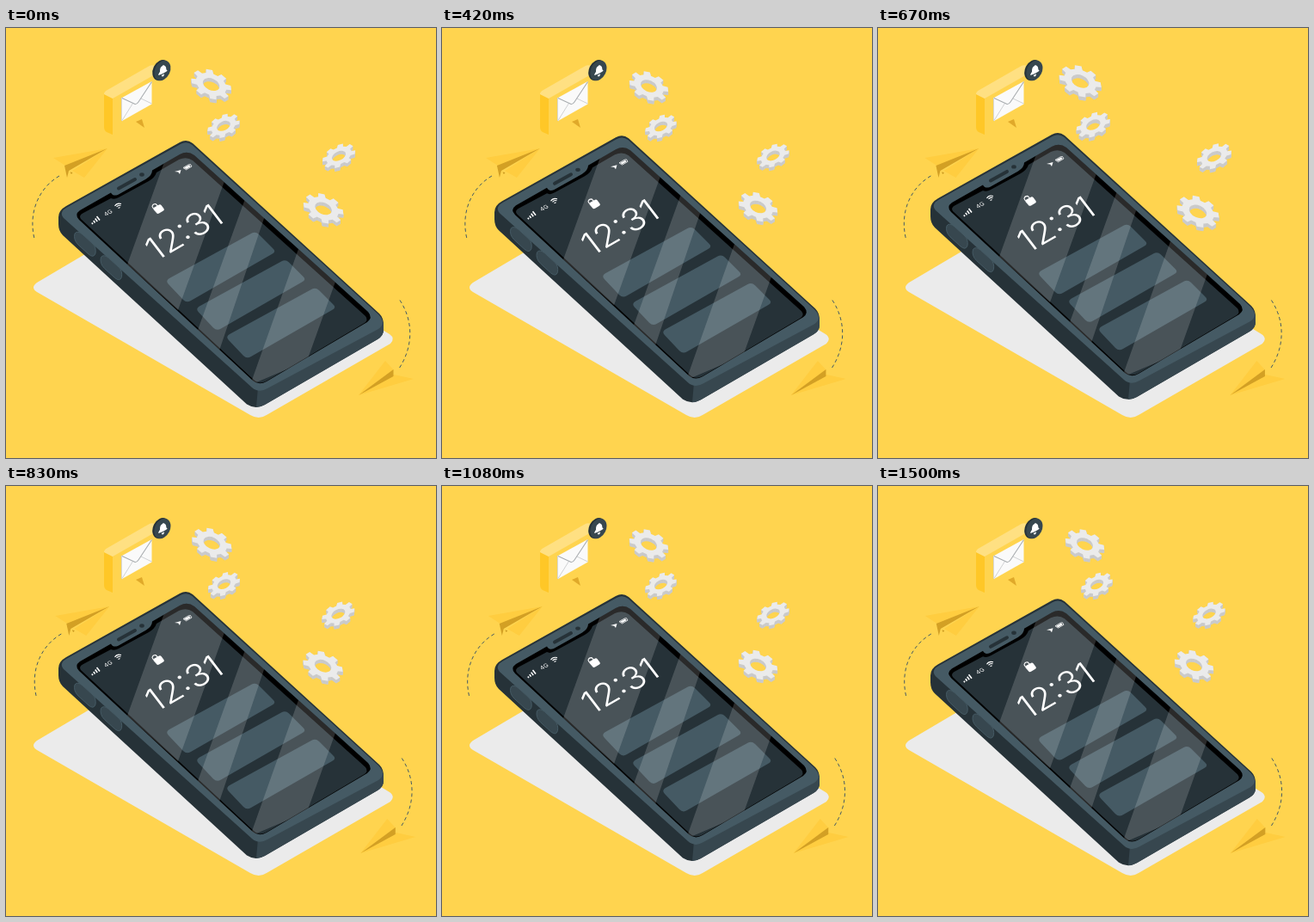
These frames come from a looping animation (500x500 px, 1.54 s). An HTML page:

```html
<!DOCTYPE html>
<html lang="en">
<head>
<meta charset="utf-8">
<title>Phone notifications</title>
<style>
html, body { margin: 0; width: 100%; height: 100%; overflow: hidden; background: #ffd44f; }
svg { display: block; width: 100%; height: 100%; }
text { font-family: Inter, Roboto, sans-serif; fill: #fff; }
</style>
</head>
<body>
<svg viewBox="0 0 500 500">
  <defs>
    <path id="bezel" d="M85 223Q79 217 86 212L122 191.500Q124 196 130 194L163 175.500Q170 171 170 165.500L202 147Q211 142 219 148L421 330Q427 337 420 342L303 411Q294 416 287 410Z"/>
    <path id="glass" d="M87 222Q84 218 90 215L122 198Q126 200 131 197L166 178Q173 174 175 168L201 153Q210 149 217 154L418 335Q422 340 416 343.500L303 410.500Q294 415 288 409Z"/>
    <clipPath id="clip"><use href="#bezel"/></clipPath>
    <path id="card" d="M189 298Q185 294 190 291L285 239Q290 236 294 240L310 256Q315 260 309 263L215 317Q210 320 206 316Z"/>
    <path id="key" d="M79 238Q82 234 88 239L100 250Q104 254 103 261Q101 267 95 262L83 251Q77 245 79 238Z"/>
  </defs>
  <rect width="500" height="500" fill="#ffd44f"/>

  <path fill="#ebebeb" d="M36 296L180 211L320 280L446 356Q453 361 447 367L303 450Q294 456 284 450L36 307Q28 302 36 296Z"/>

  <!-- message -->
  <path fill="#ffc727" d="M114 77L124 82V124L117 121Q114 119 114 115Z"/>
  <path fill="#ffe082" d="M114 77Q114 74 118 72L165 45Q169 42 173 44L182 49L124 82Z"/>
  <path fill="#e0a92a" d="M151 109L158 106L161 116Z"/>
  <path fill="#d6d6d6" d="M134 81L135.500 81V108.500L134 107.500Z"/>
  <path fill="#fafafa" d="M135 81L169.500 62V88.500L135 108Z"/>
  <g fill="none">
    <path stroke="#c4c7c9" stroke-width=".8" d="M135 107.500L147.500 87.500M169.500 88L157 82"/>
    <path stroke="#a9adb0" stroke-width="1.100" d="M135 81.500L150 88.500Q152 89 154 86L169.500 62.500"/>
  </g>
  <g transform="rotate(26 181 49)">
    <ellipse cx="180.300" cy="49.500" rx="9.200" ry="12.600" fill="#263238"/>
    <ellipse cx="182" cy="49" rx="8.800" ry="12.300" fill="#37474f"/>
  </g>
  <path fill="#fff" transform="translate(182.300 49.500) scale(.86) translate(-182.300 -49.500)" d="M176.500 54.500L178.500 51Q178 45 182 43Q183 41 184 42.500Q187 43 187 48L188.500 49.500Q188.500 51 176.500 56ZM180.500 56L184.500 54Q184 57.500 182 57.500Q180.500 57.500 180.500 56Z"/>

  <g id="gears"></g>

  <g id="planes">
    <g fill="none" stroke="#455a64" stroke-dasharray="4 3.200">
      <path d="M62 172C38 186 25 215 33.500 247"/>
      <path d="M458 316.500C474 341 474 371 456 397.500"/>
    </g>
    <path fill="#ffcd40" d="M55 151L118 140L69 160ZM77 166L118 140L91 174Z"/>
    <path fill="#d3a024" d="M68 160L118 140L73 166L71 174Z"/>
    <path fill="#c9981f" d="M74.500 167.500L77.500 168L76 170Z"/>
    <path fill="#ffcd40" d="M410 427L441 387L451 398ZM410 427L451 403L474 408Z"/>
    <path fill="#d3a024" d="M410 427L450.500 397V405Z"/>
  </g>

  <g id="phone">
    <path fill="#263238" d="M70 207L202 133Q210 128.500 217 134L434 332Q439 337 439 345V351Q439 358 432 362L301 438Q290 444 280 437.500L66 241Q61 236 61 228V220Q61 212 70 207Z"/>
    <path fill="#37474f" d="M293 418L439 342V351Q439 358 432 362L301 438Q296 441 291 441Z"/>
    <path fill="#455a64" d="M71 208.500L203 135Q210 131 216.500 136L433 333Q443 343 433 350L304 419Q294 425 286 418L67 221Q61 214 71 208.500Z"/>
    <use href="#bezel"/>
    <use href="#glass" fill="#263238"/>
    <g fill="#455a64">
      <use href="#card"/>
      <use href="#card" x="35" y="32.500"/>
      <use href="#card" x="70" y="65"/>
    </g>
    <g clip-path="url(#clip)" fill="#fff" opacity=".165">
      <path d="M141 275L198 117H276L200 328Z"/>
      <path d="M222 354L306 121H334L248 375Z"/>
      <path d="M284 415L368 178H425L350 387Z"/>
    </g>

    <path stroke="#263238" stroke-width="4" stroke-linecap="round" d="M131 186.500L150 176"/>
    <ellipse cx="158" cy="170.500" rx="2.800" ry="2.200" fill="#263238"/>
    <g fill="#37474f" stroke="#455a64">
      <use href="#key" x="1" y="1"/>
      <use href="#key" x="31.500" y="28.500"/>
    </g>

    <text font-size="41" font-weight="300" transform="matrix(.867 -.5 .564 .74 174.300 271.500)">12:31</text>
    <text font-size="7" transform="matrix(.867 -.5 .6 .7 116 219)">4G</text>
    <path stroke="#fff" stroke-width="1.600" d="M101 228L99.800 226.500M103.500 226.500L101.800 224M106.200 225L103.700 221.500M109 223.500L105.500 219"/>
    <g fill="none" stroke="#fff" stroke-width="1.100">
      <path d="M126.500 207Q129 203 134 204.500M128.500 208Q130.500 205.500 133.500 206.500"/>
      <path d="M130.500 209.500L132.500 208.500"/>
      <path d="M171.500 210L170 207.500Q170.500 204.500 174 204.500L176.500 207"/>
    </g>
    <path fill="#fff" d="M171.500 211Q170.500 209.500 172.500 208.500L178 205.500Q179.500 204.800 180.500 206L183.500 210Q184.500 211.500 183 212.500L178 215.500Q176 216.500 175 215Z"/>
    <path fill="#fff" d="M196 167L203.500 165L202 170L200.300 167.600Z"/>
    <path fill="none" stroke="#fff" stroke-width=".8" d="M206 162.500L212 159L214.500 158.500L216 161L209.500 164.800Z"/>
    <path fill="#fff" d="M207 162.600L213 159.300L214.700 161L209.700 163.900Z"/>
  </g>
</svg>
<script>
const LOOP = 1540, STEP = 1000 / 24;
const part = id => document.getElementById(id);
const gears = part('gears'), planes = part('planes'), phone = part('phone');

function gearPath(teeth = 8) {
  const pts = [], pitch = 2 * Math.PI / teeth;
  for (let i = 0; i < teeth; i++)
    for (const [off, r] of [[-.31, .76], [-.2, 1], [.2, 1], [.31, .76]]) {
      const a = (i + .5 + off) * pitch;
      pts.push((r * Math.cos(a)).toFixed(3) + ' ' + (r * Math.sin(a)).toFixed(3));
    }
  return 'M' + pts.join('L') + 'ZM.42 0A.42 .42 0 1 0 -.42 0A.42 .42 0 1 0 .42 0Z';
}

function addGear(x, y, rx, ry, tilt, depth) {
  const d = gearPath();
  for (let z = depth; z >= 0; z -= .5) {
    const p = document.createElementNS('http://www.w3.org/2000/svg', 'path');
    p.setAttribute('d', d);
    p.setAttribute('fill', z ? '#cacaca' : '#ebebeb');
    p.setAttribute('fill-rule', 'evenodd');
    p.setAttribute('transform', `translate(${x} ${y + z}) rotate(${tilt}) scale(${rx} ${ry})`);
    gears.append(p);
  }
}
addGear(240.5, 67.5, 24, 15.5, 25, 4);
addGear(254.5, 114.5, 19.5, 12, -27, 4);
addGear(385, 148.5, 20, 12, -27, 4);
addGear(367.5, 208, 24, 15.5, 25, 4);

// CSS "ease": cubic-bezier(.25, .1, .25, 1)
function ease(x) {
  let lo = 0, hi = 1, s = .5;
  for (let i = 0; i < 20; i++) {
    s = (lo + hi) / 2;
    const bx = .75 * s * (1 - s) + s ** 3;
    if (bx < x) lo = s; else hi = s;
  }
  return .3 * s * (1 - s) ** 2 + 3 * s * s * (1 - s) + s ** 3;
}
const linear = x => x;
const swing = x => (1 - Math.cos(Math.PI * x)) / 2;

function track(keys, t, curve) {
  for (let i = 1; i < keys.length; i++) {
    const [t0, v0] = keys[i - 1], [t1, v1] = keys[i];
    if (t <= t1) return v0 + (v1 - v0) * curve((t - t0) / (t1 - t0));
  }
  return keys[keys.length - 1][1];
}

const lift = [[0, 0], [705, -9.6], [1500, .3]];
const sway = [[0, 0], [190, .9], [460, -4.4], [840, 2.3], [1120, -1.4], [1500, -.2]];
const beat = [[0, 1.027], [185, 1.092], [420, 1], [620, 1.088], [1050, 1], [1500, 1]];

function draw(now) {
  const t = Math.floor((now % LOOP + 4.9) / STEP) % 37 * STEP;
  phone.setAttribute('transform', `translate(0 ${track(lift, t, linear)})`);
  planes.setAttribute('transform', `translate(${track(sway, t, swing)} 0)`);
  gears.setAttribute('transform',
    `translate(309 139) scale(${track(beat, t, ease)}) translate(-309 -139)`);
}

const start = performance.now();
function tick() {
  draw(performance.now() - start);
  requestAnimationFrame(tick);
}
tick();
</script>
</body>
</html>
```
